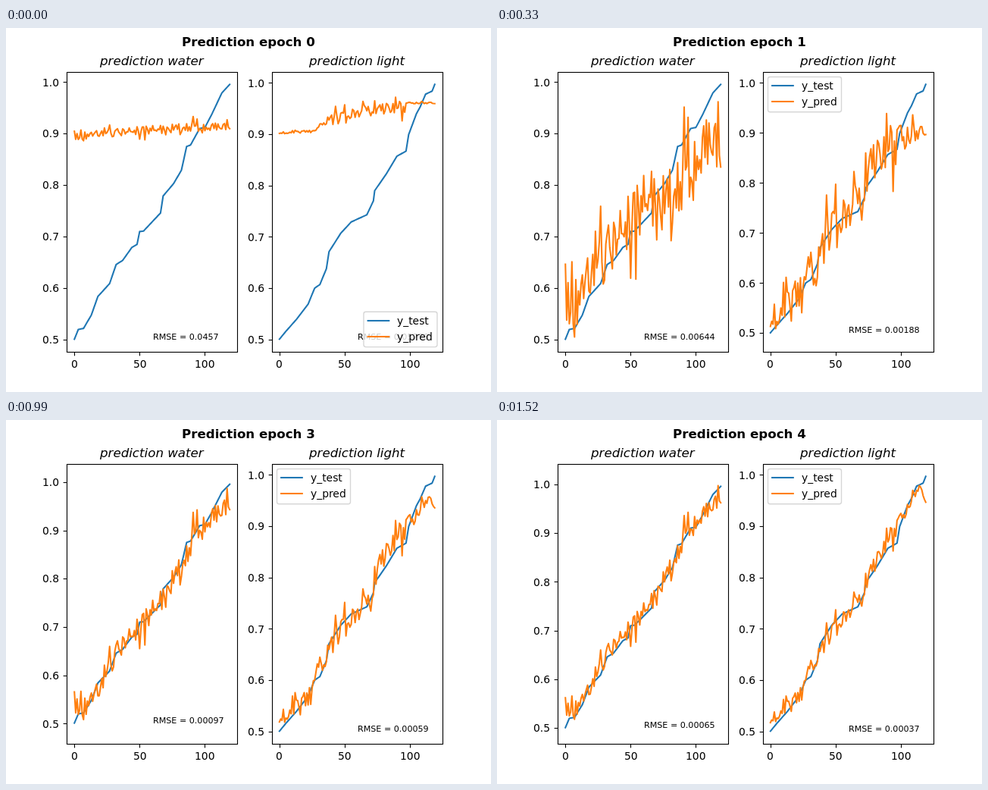
Animation of 640x480 px, one loop 1650 ms. Source, as an HTML page with a canvas:

```html
<!DOCTYPE html>
<html>
<head>
<meta charset="utf-8">
<style>
html, body { margin: 0; width: 100%; height: 100%; overflow: hidden; background: #fff; }
canvas { display: block; }
</style>
</head>
<body>
<canvas id="stage" width="640" height="480"></canvas>
<script>
const ctx = document.getElementById('stage').getContext('2d');
const BLUE = '#1f77b4', ORANGE = '#ff7f0e';
const TOP = 57.6, BOTTOM = 427.2, WIDTH = 225.45, COUNT = 120, STEP = 330;

// Straight segments through index, value pairs, sampled at every index.
function spread(pairs) {
  let k = 0;
  return Array.from({ length: COUNT }, (_, i) => {
    while (pairs[k + 2] < i) k += 2;
    const [x0, y0, x1, y1] = pairs.slice(k, k + 4);
    return y0 + (y1 - y0) * (i - x0) / (x1 - x0);
  });
}

// Seeded noise in -0.8..0.8, with a few strong outliers set by hand.
function makeNoise(seed, outliers) {
  const noise = Array.from({ length: COUNT }, (_, i) => {
    const r = Math.sin((i + 1) * 12.9898 + seed) * 43758.5453;
    return (r - Math.floor(r)) * 1.6 - .8;
  });
  for (const [i, v] of outliers) noise[i] = v;
  return noise;
}

// The noise keeps its shape over the epochs; only trend and swing change.
function fit(noise, trend, shape, size) {
  const mid = spread(trend), swing = spread(shape);
  return noise.map((n, i) => mid[i] + n * swing[i] * size);
}

const waterNoise = makeNoise(3, [
  [7, -.9], [23, 1], [27, 1.5], [29, -.8], [50, -1.6], [54, -1.8], [70, -1.1],
  [81, -1.2], [91, 2], [94, 1.5], [98, -1], [117, 1.2], [119, -.4]]);
const lightNoise = makeNoise(8, [
  [10, 1.2], [12, 1.3], [29, 1], [31, 1], [43, 1.8], [50, 1.6], [51, -1],
  [64, 1.4], [73, 1.2], [89, 1.6], [92, 1], [94, -1.7], [109, 1.5]]);
const waterShape = [0,1.2, 8,1.2, 15,.9, 119,1];
const lightShape = [0,.8, 15,1, 95,1, 105,.6, 119,.25];

const water = {
  left: 80, title: 'prediction water',
  test: spread([
    0,501, 3,520, 7,522, 13,548, 18,584, 27,609, 32,646, 37,654, 44,679, 48,685, 50,710, 53,711,
    66,746, 68,779, 76,803, 82,829, 86,875, 89,878, 96,910, 100,912, 105,936, 113,979, 119,995.5]),
  fits: [
    fit(waterNoise, [0,897, 80,911, 119,914], waterShape, 11),
    fit(waterNoise, [0,595, 8,585, 25,650, 45,715, 65,780, 75,765, 90,800, 100,855, 112,890, 119,865], waterShape, 75),
    fit(waterNoise, [0,575, 8,560, 25,640, 45,715, 65,775, 75,785, 90,870, 100,920, 112,960, 119,930], waterShape, 52),
    fit(waterNoise, [0,545, 8,540, 20,575, 32,650, 50,700, 65,750, 85,840, 95,905, 119,955], waterShape, 30),
    fit(waterNoise, [0,545, 8,545, 20,585, 32,655, 50,705, 65,755, 85,850, 95,912, 119,972], waterShape, 25)],
  ranges: [[501, 995.5], [501, 995.5], [488.5, 1028.4], [484.2, 1011.8], [493.6, 1016]],
  errors: ['0.0457', '0.00644', '0.00338', '0.00097', '0.00065']
};
const light = {
  left: 350.55, title: 'prediction light',
  test: spread([
    0,500.5, 5,516, 13,539, 22,569, 27,600, 31,607, 36,638, 38,671, 47,707, 55,729, 67,743,
    72,770, 73,790, 82,823, 90,857, 97,867, 99,899, 105,940, 108,954, 112,978, 117,984, 119,997]),
  fits: [
    fit(lightNoise, [0,902, 28,906, 34,925, 45,930, 55,940, 72,948, 95,950, 101,961, 119,961],
      [0,3, 30,3, 38,14, 95,14, 101,2, 119,2], 1),
    fit(lightNoise, [0,520, 10,545, 22,570, 35,630, 45,700, 55,735, 70,765, 76,835, 95,870, 103,895, 119,905], lightShape, 50),
    fit(lightNoise, [0,528, 10,545, 22,565, 35,650, 50,715, 70,770, 76,845, 95,885, 108,930, 119,930], lightShape, 36),
    fit(lightNoise, [0,522, 10,540, 22,560, 35,645, 50,710, 70,755, 76,825, 95,890, 114,955, 119,940], lightShape, 26),
    fit(lightNoise, [0,520, 10,540, 22,565, 35,642, 50,705, 70,760, 76,808, 95,890, 114,978, 119,950], lightShape, 20)],
  ranges: [[500.5, 997], [487.7, 997], [500.5, 997], [500.5, 997], [500.5, 997]],
  errors: ['0.05776', '0.00188', '0.00125', '0.00059', '0.00037']
};

const snap = v => Math.floor(v + .5) + .5;

// align: 0 left, .5 centre, 1 right; text starts on a whole pixel.
function text(s, x, y, size, align = 0, style = '') {
  ctx.font = `${style} ${size}px "DejaVu Sans", sans-serif`;
  ctx.fillStyle = '#000';
  ctx.fillText(s, Math.round(x - ctx.measureText(s).width * align), Math.round(y));
}

function line(points, color, width = 2.08, cap = 'square') {
  ctx.beginPath();
  points.forEach(([x, y]) => ctx.lineTo(x, y));
  ctx.strokeStyle = color;
  ctx.lineWidth = width;
  ctx.lineCap = cap;
  ctx.lineJoin = 'round';
  ctx.stroke();
}

function chart(c, epoch) {
  const [low, high] = c.ranges[epoch];
  const pad = (high - low) * .05;
  const toX = i => c.left + (i + 5.95) / 130.9 * WIDTH;
  const toY = v => TOP + (high + pad - v) / (high - low + 2 * pad) * (BOTTOM - TOP);
  const curve = (data, color) => line(data.map((v, i) => [toX(i), toY(v)]), color);
  const x0 = snap(c.left), y0 = snap(TOP), y1 = snap(BOTTOM);

  for (const i of [0, 50, 100]) {
    const x = snap(toX(i));
    line([[x, y1], [x, y1 + 4.86]], '#000', 1.11, 'butt');
    text(i, toX(i), 448, 13.89, .5);
  }
  for (let v = 500; v <= 1000; v += 100) {
    const y = snap(toY(v));
    line([[x0, y], [x0 - 4.86, y]], '#000', 1.11, 'butt');
    text((v / 1000).toFixed(1), c.left - 9.7, toY(v) + 5.2, 13.89, 1);
  }
  curve(c.test, BLUE);
  curve(c.fits[epoch], ORANGE);
  ctx.strokeStyle = '#000';
  ctx.lineWidth = 1.11;
  ctx.lineJoin = 'miter';
  ctx.strokeRect(x0, y0, snap(c.left + WIDTH) - x0, y1 - y0);
  text('RMSE = ' + c.errors[epoch], toX(60), toY(500), 11.11);
  text(c.title, c.left + WIDTH / 2, 49, 16.67, .5, 'italic');
}

function legend(x, y) {
  ctx.beginPath();
  ctx.roundRect(x, y, 97, 46.3, 2.8);
  ctx.fillStyle = 'rgba(255,255,255,.8)';
  ctx.fill();
  ctx.strokeStyle = 'rgba(204,204,204,.8)';
  ctx.lineWidth = 1.39;
  ctx.stroke();
  [['y_test', BLUE], ['y_pred', ORANGE]].forEach(([label, color], i) => {
    const row = y + i * 20.7, mid = Math.round(row + 11.6);
    line([[x + 5.6, mid], [x + 33.3, mid]], color);
    text(label, x + 44.4, row + 16.5, 13.89);
  });
}

function draw() {
  const epoch = Math.floor(performance.now() / STEP) % 5;
  ctx.fillStyle = '#fff';
  ctx.fillRect(0, 0, 640, 480);
  text('Prediction epoch ' + epoch, 320, 24, 16.67, .5, 'bold');
  chart(water, epoch);
  chart(light, epoch);
  if (epoch) legend(357.5, 64.5);
  else legend(472, 374.3);
  requestAnimationFrame(draw);
}
draw();
</script>
</body>
</html>
```
